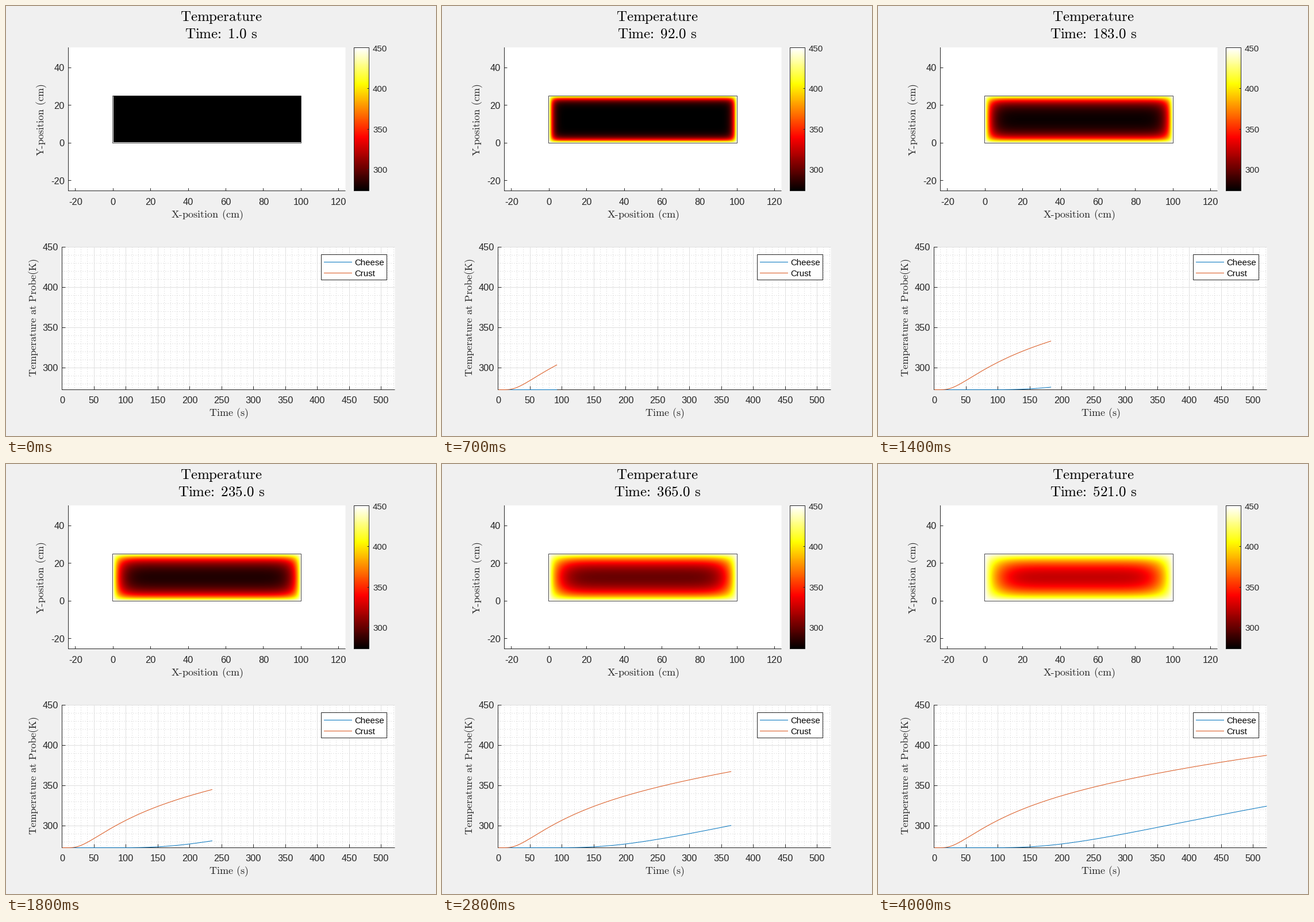
A matplotlib script for the animation above (4100 ms loop, 748 by 748 pixels).

```python
import math

import matplotlib.pyplot as plt
import numpy as np
from matplotlib.animation import FuncAnimation
from matplotlib.colors import LinearSegmentedColormap
from matplotlib.patches import Rectangle

plt.rcParams["mathtext.fontset"] = "cm"

SIZE, DPI = 748, 100
PX = 72 / DPI              # one pixel in points
FRAMES, INTERVAL = 41, 100
COLD, SPAN = 273, 177      # start temperature and rise to the oven (K)
LENGTH, HEIGHT = 100, 25   # cm
PROBE, MIDDLE = 3, 12.5    # probe depths below the surface (cm)
SCALE = 3.27               # pixels per cm
DARK, BLUE, ORANGE = "#262626", "#0072BD", "#D95319"
SPACE = r"\hspace{0.38}"

HOT = LinearSegmentedColormap.from_list(
    "heat", [(0, "black"), (0.375, "red"), (0.75, "yellow"), (1, "white")], N=256)

erfc = np.vectorize(math.erfc, otypes=[float])


# ---- heat model ----
def crust_depth(t):
    """Diffusion-scaled depth of the crust probe."""
    return 1 / np.sqrt(t * (0.0117 + 0.0067 * (t / 521) ** 2.8))


def cheese_depth(t):
    """Diffusion-scaled depth of the cheese probe in the centre."""
    return MIDDLE / 2 / np.sqrt(0.0753 * np.maximum(t - 31, 1))


def crust_temp(t):
    return COLD + SPAN * erfc(crust_depth(t))


def cheese_temp(t):
    return COLD + 2 * SPAN * erfc(cheese_depth(t))


def heat_field(t):
    cols, rows = round(LENGTH * SCALE), round(HEIGHT * SCALE)
    if t < 2:
        u = np.zeros((rows, cols))
        u[-1, :] = u[:, 0] = 1
        return u
    # a resistive crust (exponential part) around a uniform core (linear part)
    outer, inner = crust_depth(t), cheese_depth(t)
    shell = 1 - math.exp(-1)
    ratio = shell / (1 - math.exp(-MIDDLE / PROBE))
    core = min((ratio * inner - outer) / (ratio * MIDDLE - PROBE), outer / PROBE)
    crust_part = (outer - core * PROBE) / shell

    def warm(d):
        return erfc(core * d + crust_part * (1 - np.exp(-d / PROBE)))

    x = (np.arange(cols) + 0.5) / cols * LENGTH
    y = (np.arange(rows) + 0.5) / rows * HEIGHT
    across = warm(np.minimum(x, LENGTH - x))
    down = np.minimum(warm(y) + warm(HEIGHT - y), 1)
    return 1 - np.outer(1 - down, 1 - across)


# ---- stage in pixel coordinates ----
fig = plt.figure(figsize=(SIZE / DPI, SIZE / DPI), dpi=DPI, facecolor="#f0f0f0")
ax = fig.add_axes([0, 0, 1, 1])
ax.axis("off")


def stroke(x0, y0, x1, y1, color=DARK, z=3, **kw):
    ax.plot([x0, x1], [y0, y1], color=color, lw=PX, zorder=z,
            solid_capstyle="butt", snap=False, **kw)


def vline(x, y0, y1, *args, **kw):
    x = math.floor(x) + 0.5
    stroke(x, y0, x, y1, *args, **kw)


def hline(y, x0, x1, *args, **kw):
    y = math.floor(y) + 0.5
    stroke(x0, y, x1, y, *args, **kw)


def box(x0, y0, x1, y1, face="none", edge="none", z=1, width=1):
    ax.add_patch(Rectangle((x0, y0), x1 - x0, y1 - y0, facecolor=face,
                           edgecolor=edge, lw=width * PX, zorder=z, snap=False))


def label(x, y, s, size=16.4, ha="center", color=DARK):
    ax.text(x, y, s, fontsize=size * PX, family="Liberation Sans", ha=ha,
            va="baseline", color=color, zorder=8)


def roman(s):
    return r"$\mathrm{" + s.replace(" ", SPACE) + "}$"


def serif(x, y, s, size=18.1, rotation=0, color=DARK):
    return ax.text(x, y, roman(s), fontsize=size * PX, ha="center", va="baseline",
                   rotation=rotation, rotation_mode="anchor", color=color, zorder=8)


def clock(t):
    return roman(r"Time\hspace{-0.2}:\hspace{0.306}" + f"{t:.1f} s")


# ---- upper plot ----
box(108, 72, 590.5, 322, face="white")
vline(108, 72, 322)
hline(321, 108, 590.5)
for v in range(-20, 121, 20):
    x = 186.3 + SCALE * v
    vline(x, 317, 321)
    label(x, 345.8, str(v))
for v in range(-20, 41, 20):
    y = 238.3 - SCALE * v
    hline(y, 109, 113.5)
    label(102, y + 5.8, str(v), ha="right")
image = ax.imshow(heat_field(1), cmap=HOT, vmin=0, vmax=1, aspect="auto",
                  extent=(186, 513, 238, 156), interpolation="nearest", zorder=2)
box(185.5, 156.5, 513.5, 238.5, edge="black", z=3, width=0.7)

serif(374.5, 25.5, "Temperature", 25, color="black")
title = serif(374.5, 55, "Time", 25, color="black")
serif(349.5, 368, "X position (cm)")
hline(364, 300.8, 305.6)
serif(66.5, 198, "Y position (cm)", rotation=90)
vline(62, 243.5, 248.3)

# ---- colour bar ----
ax.imshow(np.linspace(1, 0, 256)[:, None], cmap=HOT, vmin=0, vmax=1, aspect="auto",
          extent=(605.5, 631.5, 321.5, 72.5), zorder=2)
box(605.5, 72.5, 631.5, 321.5, edge=DARK, z=3)
for v in range(300, 451, 50):
    y = 73 + (450 - v) * 1.41
    if v < 450:
        hline(y, 628.5, 631.5)
    label(638, y + 5.7, str(v), 15, ha="left")

# ---- lower plot ----
LEFT, RIGHT, TOP, BOTTOM = 97.5, 676.5, 419.5, 667.5


def time_x(t):
    return LEFT + 1.11 * t


def temp_y(v):
    return BOTTOM - (v - COLD) / SPAN * (BOTTOM - TOP)


box(LEFT, TOP, RIGHT, BOTTOM, face="white")
dots = dict(color="#cccccc", z=2, linestyle=(0, (1, 3)), dash_capstyle="butt")
for t in range(0, 521, 10):
    x = time_x(t)
    if t % 50:
        vline(x, TOP, BOTTOM, **dots)
        continue
    vline(x, TOP, BOTTOM, "#dfdfdf", z=2.2)
    vline(x, 661.5, BOTTOM)
    label(x, 691, str(t))
for v in range(280, 451, 10):
    y = temp_y(v)
    if v % 50:
        hline(y, LEFT, RIGHT, **dots)
        continue
    hline(y, LEFT, RIGHT, "#dfdfdf", z=2.2)
    hline(y, LEFT, 103.5)
    label(91, y + 5.8, str(v), ha="right")
vline(LEFT, 419, 668)
hline(BOTTOM, 97, RIGHT)
serif(387.5, 713, "Time (s)")
serif(53, 542.5, "Temperature at Probe(K)", rotation=90)

cheese, = ax.plot([], [], color=BLUE, lw=PX, zorder=5, snap=False)
crust, = ax.plot([], [], color=ORANGE, lw=PX, zorder=5, snap=False)

# ---- legend ----
box(548.5, 432.5, 662.5, 476.5, face="white", edge=DARK, z=6)
for y, color, name in ((445, BLUE, "Cheese"), (464, ORANGE, "Crust")):
    hline(y, 553, 602, color, z=7)
    label(606, y + 6.2, name, 15, ha="left", color="black")

ax.set_xlim(0, SIZE)
ax.set_ylim(SIZE, 0)


def update(n):
    now = 1 + 13 * n
    title.set_text(clock(now))
    image.set_data(heat_field(now))
    t = np.arange(1, now + 1)
    cheese.set_data(time_x(t), temp_y(cheese_temp(t)))
    crust.set_data(time_x(t), temp_y(crust_temp(t)))
    return title, image, cheese, crust


anim = FuncAnimation(fig, update, frames=FRAMES, interval=INTERVAL, repeat=True,
                     repeat_delay=0, blit=False)
plt.show()
```
